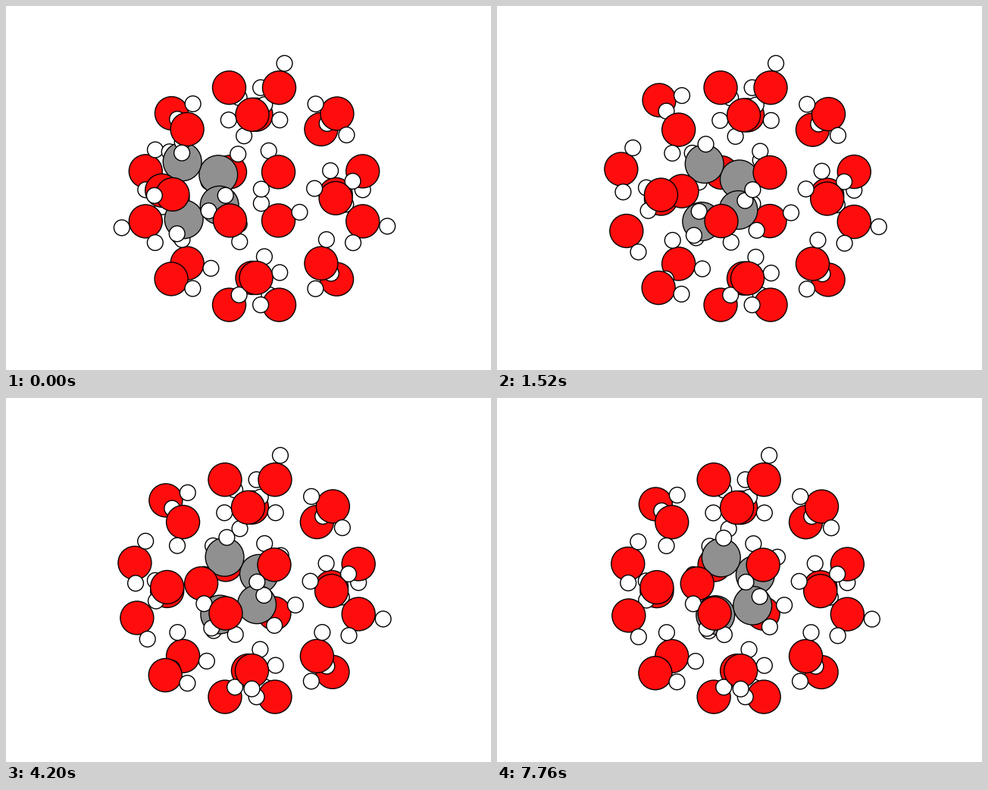
Animation, 640 px wide and 480 px high, one loop 7800 ms. Source, as a matplotlib script:

```python
import numpy as np
import matplotlib.pyplot as plt
from matplotlib.animation import FuncAnimation
from matplotlib.patches import Circle

# Positions are complex pixels, x + y*1j with y pointing down.
W, H, DPI = 640, 480, 100
STEP, FRAMES = 40, 195
MIDDLE_X = 328
CAGE = 328.7 + 250.9j
RING = CAGE - 80.8 - 7.6j

RADIUS = {"O": 22.0, "C": 25.4, "H": 10.4}
COLOR = {"O": "#ff0d0d", "C": "#909090", "H": "#ffffff"}

# The ring slides into the cage while the left waters yield and return.
TIMES = [0, 520, 1520, 1680, 3120, 4200, 5520, 7760]
SLIDE = [0, 14.2, 37.7, 41.5, 51.1, 57.2, 62.3, 66.6]
PUSH = [0, 0.95, 1, 0.73, 0.52, 0.42, 0.28, 0.15]

YIELD = {"q2": -21 - 3.5j, "p2": -14 + 12j, "f2": -5 - 18j,
         "f1": -5.5 + 11j, "a2": -4, "A2": -4}

# Ring atoms: kind, place, depth
RING_ATOMS = [
    ("O", -41, 5), ("C", -14 - 38j, 0), ("C", 33.5 - 21j, -10),
    ("C", 35 + 19.5j, 10), ("C", -12 + 38j, 0),
    ("H", -14 - 64j, 25), ("H", -31 - 51j, -25), ("H", 59.5 - 48j, -5),
    ("H", 43 + 6.5j, 30), ("H", 61 + 44.5j, 0),
    ("H", -21 + 57j, 25), ("H", -18 + 60j, -25),
]

# Donor and acceptor of every hydrogen bond
BONDS = """p0A0 p0q0 q0f0 q3p3 p1q1 p1a1 q1A1 p3a3 f3q3 f3p0 n3f3 A0i3 a0n3
a0q0 n0A0 f0n0 f0p1 i3A3 i3i1 i0A0 i0i2 i1A2 i1A1 i2a2 a3n3 a3q3 A3n2 A3i2
A1i0 A1n0 f2p3 f2n2 n2A2 q2f2 q2p2 p2f1 f1q1 f1n1 n1A1 n1A2 a2q2 a2p2""".split()
BOND_PART, BOND_MAX = 0.37, 32

# Unbonded hydrogens: water, offset, start of turn, visible before and after
FREE = [("q3", 7 - 32j, 0, 1, 1), ("q0", 32.5 + 6.5j, 0, 1, 1),
        ("p2", -31.5 + 8.5j, 0, 1, 0), ("A2", -24 + 1.5j, 700, 1, 0),
        ("A1", 24j, 1700, 0, 1)]
TURN = 500


def build_cage():
    """Oxygens by quarter turns; k = 0..3 is right, bottom, left, top."""
    cage = {}
    for k in range(4):
        s = (-1) ** k
        shells = {
            "a": (107.6 - 2.5j * s, -100),   # side centre, back
            "A": (107.6 + 2.5j * s, 100),    # side centre, front
            "p": (143.2 - 33j, 32 * s),      # outer pair
            "q": (143.2 + 33j, -32 * s),
            "n": (88.4 + 88.4j, 90 * s),     # corner, near
            "f": (109 + 109.4j, -30 * s),    # corner, far
            "i": (32 + 32j, -143 * s),       # inner square
        }
        for name, (place, depth) in shells.items():
            cage[f"{name}{k}"] = (CAGE + place * 1j ** k, depth)
    return cage


cage = build_cage()
PINNED = {"p1", "q1", "p3", "q3"}


def layout(t):
    """Return (kind, place, depth) of all atoms at time t."""
    slide = np.interp(t, TIMES, SLIDE)
    push = np.interp(t, TIMES, PUSH)
    sink = 0.018j * slide

    water = {}
    for name, (place, depth) in cage.items():
        place = place + push * YIELD.get(name, 0)
        water[name] = (place if name in PINNED else place + sink, depth)
    atoms = [("O", *w) for w in water.values()]

    for bond in BONDS:
        (start, z0), (end, z1) = water[bond[:2]], water[bond[2:]]
        arm = BOND_PART * (end - start)
        arm *= min(1, BOND_MAX / abs(arm))
        atoms.append(("H", start + arm, z0 + BOND_PART * (z1 - z0) + 1))

    for name, offset, begin, before, after in FREE:
        shown = np.interp(t, [begin, begin + TURN], [before, after])
        place, depth = water[name]
        atoms.append(("H", place + offset * shown, depth + 20 * shown - 10))

    shift = slide * (1 + 0.1j)
    turn = np.exp(0.0019j * slide)
    atoms += [(kind, RING + shift + place * turn, depth)
              for kind, place, depth in RING_ATOMS]
    return atoms


fig = plt.figure(figsize=(W / DPI, H / DPI), dpi=DPI, facecolor="white")
ax = fig.add_axes([0, 0, 1, 1])
ax.set_xlim(0, W)
ax.set_ylim(H, 0)
ax.axis("off")

discs = [ax.add_patch(Circle((0, 0), RADIUS[kind], facecolor=COLOR[kind],
                             edgecolor="black", linewidth=1))
         for kind, _, _ in layout(0)]


def draw(i):
    atoms = layout(i * STEP)
    # Keep the whole cluster centred horizontally.
    lo = min(place.real - RADIUS[kind] for kind, place, _ in atoms)
    hi = max(place.real + RADIUS[kind] for kind, place, _ in atoms)
    dx = MIDDLE_X - (lo + hi) / 2
    for disc, (_, place, depth) in zip(discs, atoms):
        disc.center = place.real + dx, place.imag
        disc.set_zorder(depth)
    return discs


anim = FuncAnimation(fig, draw, frames=FRAMES, interval=STEP,
                     init_func=lambda: draw(0), repeat=True, repeat_delay=0)
plt.show()
```
